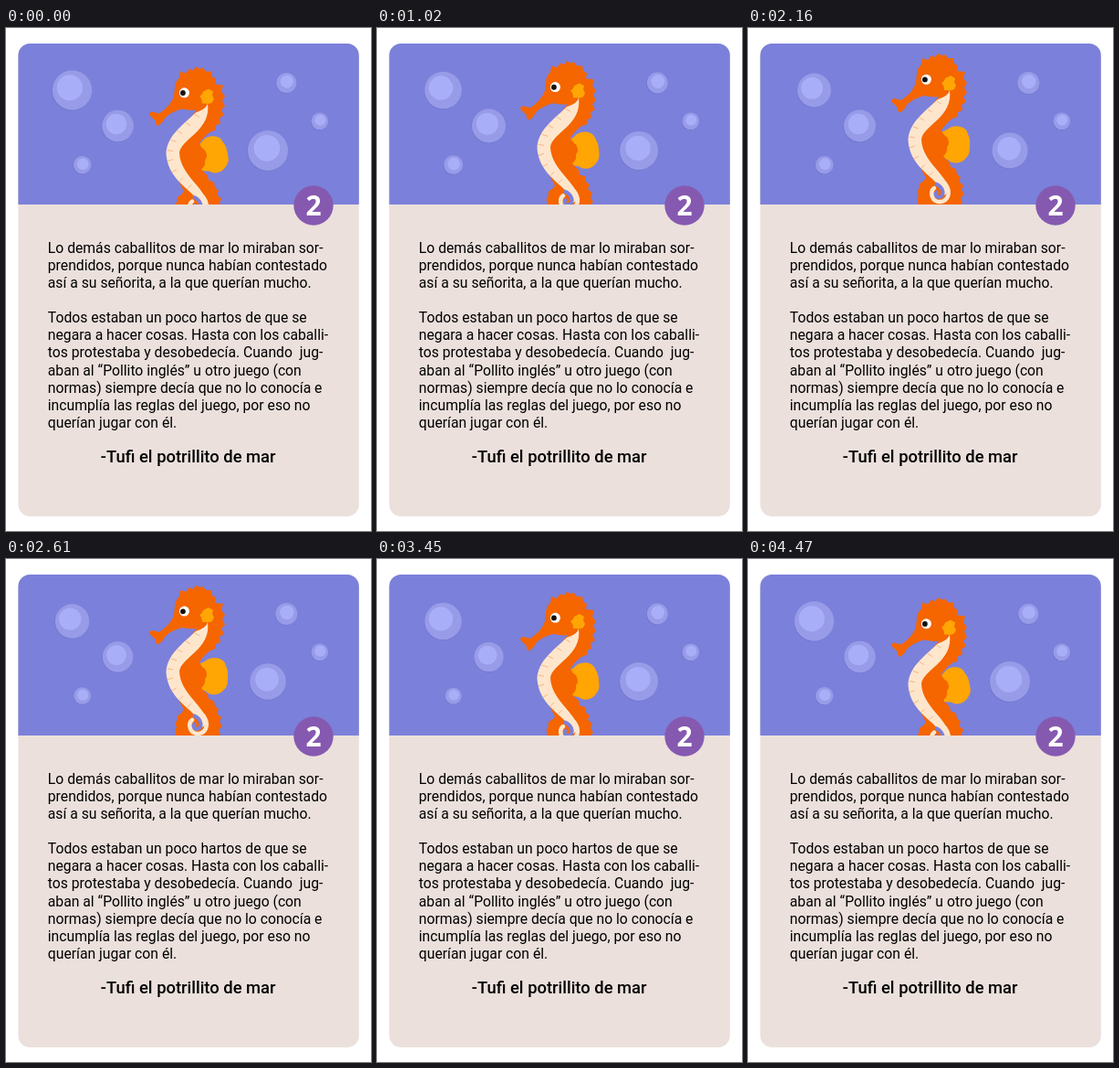
Recreate the animation shown at these times as an HTML page. Size 400 px wide and 550 px high, loop 4.5 s.

```html
<!DOCTYPE html>
<html lang="es">
<head>
<meta charset="utf-8">
<style>
html, body { margin: 0; width: 100%; height: 100%; overflow: hidden; background: #fff; }
svg { display: block; width: 400px; height: 550px; }
text { font-family: Roboto, sans-serif; white-space: pre; }
#story { font-size: 15.72px; fill: #000; }
</style>
</head>
<body>
<svg viewBox="0 0 400 550">
  <defs>
    <clipPath id="card"><rect x="13.4" y="17" width="373.4" height="517" rx="13"/></clipPath>
    <clipPath id="sea"><rect x="13" y="17" width="374" height="176"/></clipPath>
  </defs>
  <g clip-path="url(#card)">
    <rect x="13" y="17" width="374" height="517" fill="#ebe0dc"/>
    <rect x="13" y="17" width="374" height="176" fill="#7b80da"/>
  </g>
  <g clip-path="url(#sea)">
    <g id="bubbles"></g>
    <g id="seahorse">
      <path id="fin" fill="#ffa504" d="M209 114Q217 113 221 109Q227 106 233 108Q240 110 241 116Q244 122 243 130
        Q243 139 239 142Q235 147 229 147.5Q222 148 219 144L211 141Z"/>
      <path fill="#f56500" d="M186 196C187 191 184 187 187 183Q184 178 188 175Q186 170 192 168Q194 163 201 164
        C209 165 213 171 213 178L216 196Z"/>
      <path fill="#f56500" d="M185 50Q186 43 190 40L191 33L197 35L201 30L205 32L208 27.6L212 30L216 29L219 33L225 33L226 39
        L230 41L229 47L238 48L236 55L240 60L237 65L240 71L236 75L239 81L234 84L235 90L230 92L230 97L224 99
        Q216 105 212 112Q215 118 218 119Q222 126 218 130Q219 136 214 140Q217 144 221 147L222 152L228 154L229 160L233 163L231 168
        L236 172L234 177L237 182L233 186L235 191L231 196L206 196C203 170 184 152 181 128C183 106 196 92 209 75
        Q203 76 193 74Q181 77 174 84L172 88L167 92.5Q163 91 164 87L157.5 81Q156 78 160 77L168 79Q181 70 184 60Z"/>
      <path fill="#fde6cc" d="M221 68Q220 74 208 78C193 92 176 104 175.5 123C177 146 194 157 204 167
        Q211 174 215 183L221 179C219 160 191 147 190 122C192 106 225 98 221 68Z"/>
      <path fill="none" stroke="#7b80da" stroke-width="4" d="M205 170C214 173 217 184 209 185C205 185 204 181 208 179"/>
      <path fill="none" stroke="#fde6cc" stroke-width="4.5" stroke-linecap="round"
        d="M216 170C224 181 218 190 210 190C201 190 199 179 204 175"/>
      <path fill="none" stroke="#f8b583" stroke-width="1"
        d="M207 80l5 3M197 89l5 3M188 98l5 3M181 108l6 2M177 119l6 1M177 131l6-2M182 143l5-3M190 153l4-4M199 161l4-4"/>
      <path fill="#ffa504" d="M212 60Q215 59 216 55L222 52L227 55L226 59L228 63L226 67Q222 69 219 68L215 68Q215 63 212 60Z"/>
      <circle cx="195.4" cy="56.2" r="5.5" fill="#fff"/>
      <circle cx="193.9" cy="56.4" r="2.9" fill="#111"/>
    </g>
  </g>
  <circle cx="337" cy="194" r="21.7" fill="#8659b0"/>
  <text x="337" y="205" text-anchor="middle" fill="#fff"
    style="font: 700 30px 'Open Sans', sans-serif">2</text>
  <g id="story"></g>
  <text x="199.7" y="475" text-anchor="middle" font-size="18.4" font-weight="500">-Tufi el potrillito de mar</text>
</svg>
<script>
const LOOP = 4500, RISE = 14.6, FIN_TILT = 15, TURN = 2 * Math.PI;
const lines = [
  'Lo demás caballitos de mar lo miraban sor-',
  'prendidos, porque nunca habían contestado',
  'así a su señorita, a la que querían mucho.',
  '',
  'Todos estaban un poco hartos de que se',
  'negara a hacer cosas. Hasta con los caballi-',
  'tos protestaba y desobedecía. Cuando  jug-',
  'aban al “Pollito inglés” u otro juego (con',
  'normas) siempre decía que no lo conocía e',
  'incumplía las reglas del juego, por eso no',
  'querían jugar con él.'
];
// x, y, radius, radius swing, phase in turns, highlight offset x, y
const bubbles = [
  [72.5, 68, 20.1, 1.6, 0, -2.5, -2.5],
  [122.5, 107, 17.3, 1.2, 0.25, -1.5, -2],
  [83.7, 149.7, 9.7, 0.7, 0.25, 0.5, -1],
  [307.3, 60, 11.5, 0.5, 0.5, 0.5, -1.5],
  [343.8, 101.8, 9.3, 0, 0, 0.5, -1],
  [287, 134, 20.8, 1.2, 0, -1, -2.5]
];

const byId = id => document.getElementById(id);
function add(parent, tag, attrs) {
  const node = document.createElementNS('http://www.w3.org/2000/svg', tag);
  for (const key in attrs) node.setAttribute(key, attrs[key]);
  return parent.appendChild(node);
}

lines.forEach((line, i) => {
  add(byId('story'), 'text', { x: 45.8, y: 245.7 + i * 19.12 }).textContent = line;
});

const bubbleNodes = bubbles.map(([, , r, , , dx, dy]) => {
  const group = add(byId('bubbles'), 'g');
  add(group, 'circle', { r, cx: -0.6, cy: 0.8, fill: '#7277d0' });
  add(group, 'circle', { r, fill: '#989ce8' });
  add(group, 'circle', { r: r * 0.65, cx: dx, cy: dy, fill: '#a9aef8' });
  return group;
});

function draw(now) {
  const angle = now % LOOP / LOOP * TURN;
  const sink = (1 + Math.cos(angle)) / 2;
  byId('seahorse').setAttribute('transform', `translate(0 ${RISE * sink})`);
  byId('fin').setAttribute('transform', `rotate(${-FIN_TILT * sink} 214 127)`);
  bubbles.forEach(([x, y, r, swing, phase], i) => {
    const scale = 1 + swing / r * Math.cos(angle - phase * TURN);
    bubbleNodes[i].setAttribute('transform', `translate(${x} ${y}) scale(${scale})`);
  });
}

const start = performance.now();
function tick() {
  draw(performance.now() - start);
  requestAnimationFrame(tick);
}
tick();
</script>
</body>
</html>
```
